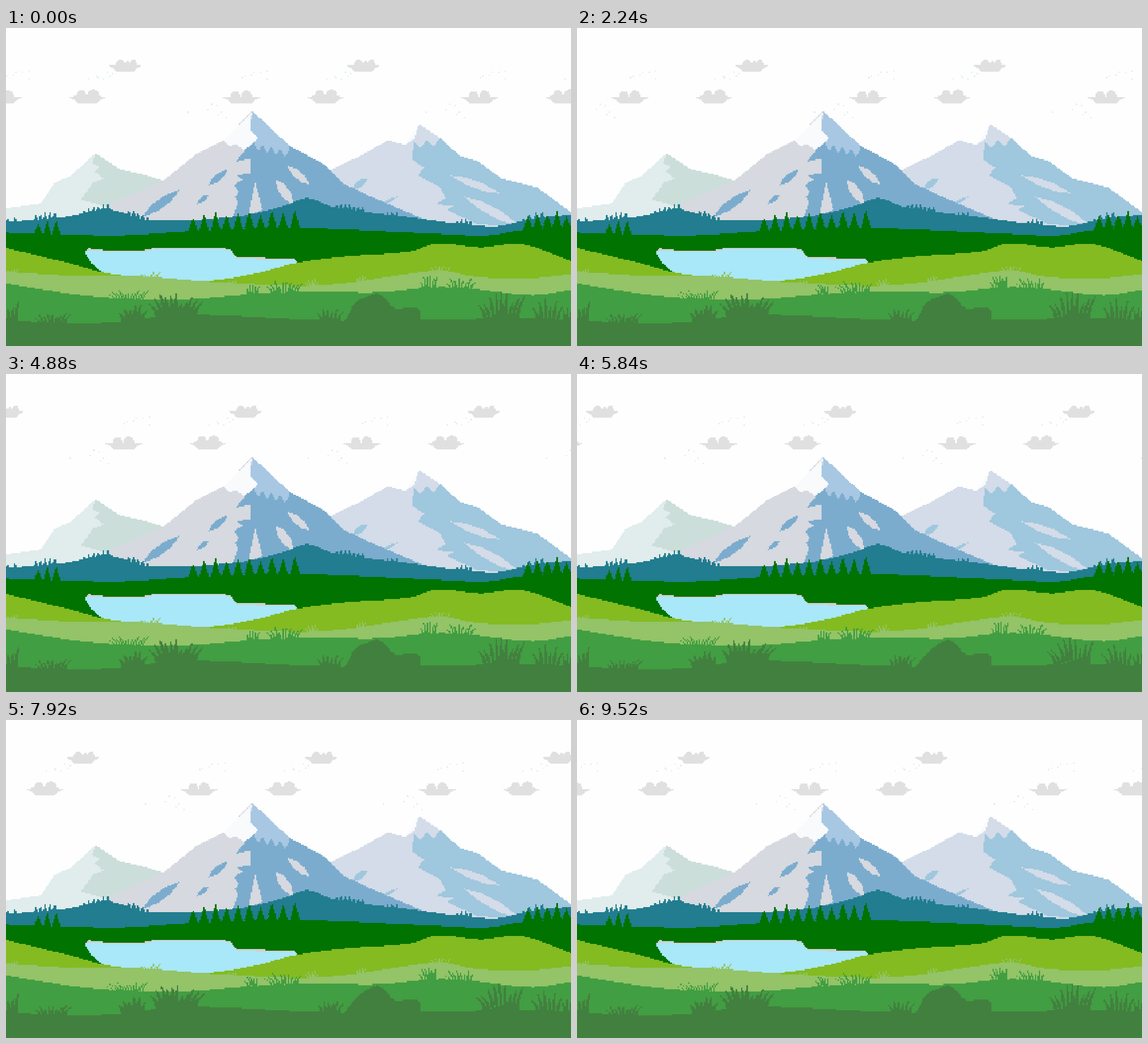
These frames come from a looping animation (998x561 px, 9.6 s). An HTML page with a canvas:

```html
<!DOCTYPE html>
<html lang="en">
<head>
<meta charset="utf-8">
<title>Mountain meadow</title>
<style>
html, body { margin: 0; width: 100%; height: 100%; overflow: hidden; background: #fefefe; }
canvas { display: block; width: 998px; height: 561px; image-rendering: pixelated; }
</style>
</head>
<body>
<canvas id="stage" width="427" height="240"></canvas>
<script>
const W = 427, H = 240, S = 998 / W;
const LOOP = 9600, STEP = 80, TILE = 180;
const TEAL = '#217d8f', PINE = '#007300', OLIVE = '#83bb21', PALE = '#94c368', MID = '#429e42', NEAR = '#42803f';
const stage = document.getElementById('stage').getContext('2d');
const backdrop = document.createElement('canvas');
backdrop.width = W;
backdrop.height = H;
let ctx = backdrop.getContext('2d');

const points = s => s.split(', ').map(p => p.split(' ').map(Number));
const random = seed => () => (seed = (seed * 16807 + 11) % 2147483647) / 2147483647;
const move = (pts, dx, dy = 0) => pts.map(([x, y]) => [x + dx, y + dy]);

// Scanline fill on the coarse grid, so every edge stays hard.
function fill(color, pts) {
  const ys = pts.map(p => p[1] / S);
  const top = Math.max(0, Math.floor(Math.min(...ys)));
  const end = Math.min(H, Math.ceil(Math.max(...ys)));
  ctx.fillStyle = color;
  for (let row = top; row < end; row++) {
    const y = (row + 0.5) * S, hits = [];
    pts.forEach(([x1, y1], i) => {
      const [x2, y2] = pts[(i + 1) % pts.length];
      if ((y1 <= y) !== (y2 <= y)) hits.push(x1 + (y - y1) / (y2 - y1) * (x2 - x1));
    });
    hits.sort((a, b) => a - b);
    for (let i = 0; i + 1 < hits.length; i += 2) {
      const a = Math.round(hits[i] / S), b = Math.round(hits[i + 1] / S);
      if (b > a) ctx.fillRect(a, row, b - a, 1);
    }
  }
}

// Curve through key points, closed along the bottom of the stage.
function land(s) {
  const p = points(s), out = [];
  for (let i = 0; i < p.length - 1; i++) {
    const a = p[Math.max(0, i - 1)], b = p[i], c = p[i + 1], d = p[Math.min(p.length - 1, i + 2)];
    const bend = (c[1] - a[1]) / (c[0] - a[0]) * (c[0] - b[0]);
    const next = (d[1] - b[1]) / (d[0] - b[0]) * (c[0] - b[0]);
    for (let t = 0; t < 1; t += 0.125) {
      const u = 1 - t, ease = t * t * (3 - 2 * t);
      out.push([b[0] + t * (c[0] - b[0]), b[1] + ease * (c[1] - b[1]) + t * u * u * bend - t * t * u * next]);
    }
  }
  return [...out, p[p.length - 1], [998, 561], [0, 561]];
}

// Row of hanging teeth between two points.
function teeth(x1, y1, x2, y2, n, depth) {
  return Array.from({ length: 2 * n + 1 }, (_, i) => {
    const t = i / (2 * n);
    return [x1 + t * (x2 - x1), y1 + t * (y2 - y1) + (i % 2 ? depth : 0)];
  });
}

function streak(color, x1, y1, x2, y2, w) {
  const len = Math.hypot(x2 - x1, y2 - y1), nx = (y1 - y2) / len * w / 2, ny = (x2 - x1) / len * w / 2;
  const at = (t, side) => [x1 + t * (x2 - x1) + side * nx, y1 + t * (y2 - y1) + side * ny];
  fill(color, [at(0, 0), at(0.35, 1), at(0.7, 1), at(1, 0), at(0.65, -1), at(0.3, -1)]);
}

function forest(color, x1, x2, count, y1, y2, tall, half) {
  const rnd = random(x1 + 77);
  for (let i = 0; i < count; i++) {
    const t = count > 1 ? i / (count - 1) : 0, x = x1 + t * (x2 - x1), base = y1 + t * (y2 - y1);
    const h = tall * (0.75 + 0.35 * rnd()), left = [], right = [];
    for (let k = 1; k <= 8; k++) {
      const w = half * (k / 8) * (k % 2 ? 1.1 : 0.85);
      left.unshift([x - w, base - h + h * k / 8]);
      right.push([x + w, base - h + h * k / 8]);
    }
    fill(color, [[x, base - h], ...right, [x + half, base + 8], [x - half, base + 8], ...left]);
  }
}

// Fan of blades; the tips lean by dx while the roots stay.
function tuft(color, cx, base, half, tall, count, width, dx = 0) {
  const rnd = random(Math.round(cx * 7 + half));
  for (let i = 0; i < count; i++) {
    const u = count > 1 ? 2 * i / (count - 1) - 1 : 0;
    const root = cx + u * half * 0.65, x = cx + u * half + dx;
    const y = base - tall * (0.45 + 0.55 * rnd());
    const mid = root + (x - root) * 0.35, my = (base + y) / 2;
    fill(color, [[root - width, base + 5], [mid - width * 0.7, my], [x - 1, y], [x + 1.3, y],
      [mid + width * 0.7, my], [root + width, base + 5]]);
  }
}

function paintMountains() {
  const mint = '#cbdeda', ice = '#e1ecec', mist = '#d3dce8', sky = '#9fc7dd';
  const grey = '#d6d9df', blue = '#7bacce', cap = '#a7c7e3', snow = '#f8fafc';

  fill(mint, points('132 303, 158 221, 200 249, 240 258, 285 271, 240 345, 130 345'));
  fill(ice, points('0 318, 62 309, 86 273, 113 262, 158 221, 152 238, 166 245, 157 253, 173 266, 154 272, 132 303, 190 318, 190 345, 0 345'));

  fill(mist, points('570 252, 625 226, 675 198, 705 206, 730 170, 767 194, 802 226, 920 350, 600 350'));
  fill(snow, points('705 206, 727 174, 722 195'));
  fill(sky, [...teeth(720, 200, 767, 194, 2, 13), ...points('802 226, 833 235, 876 266, 938 281, 998 325, 998 352, 880 350, 830 345, 778 320, 790 314, 760 311, 776 300, 766 280, 727 260, 738 247, 717 232')]);
  streak(sky, 638, 266, 612, 284, 11);
  streak(sky, 692, 297, 661, 313, 5);
  streak(mist, 784, 260, 874, 292, 12);
  streak(mist, 808, 297, 908, 349, 15);

  fill(grey, points('435 146, 470 250, 450 345, 200 345, 180 312, 280 268, 335 223, 385 198'));
  fill(blue, points('434 200, 500 208, 558 238, 597 275, 640 295, 740 338, 400 338, 410 306, 404 298, 411 290, 403 276, 418 268, 408 260, 433 256, 433 230, 406 236'));
  streak(blue, 392, 249, 358, 278, 11);
  streak(blue, 307, 285, 240, 334, 15);
  streak(blue, 358, 293, 337, 310, 8);
  streak(grey, 476, 267, 508, 311, 16);
  streak(grey, 496, 243, 537, 277, 13);
  fill(grey, points('440 271, 453 320, 428 332'));
  fill(cap, [[435, 146], [500, 207], ...teeth(500, 217, 438, 203, 4, 12), [432, 210], [445, 195], [432, 180]]);
  fill(snow, [[434, 148], [432, 180], [445, 195], ...teeth(430, 210, 384, 198, 2, 8)]);
}

function paintHills() {
  fill(TEAL, land('0 342, 100 334, 178 320, 255 339, 410 332, 490 314, 532 300, 580 316, 700 332, 860 350, 925 337, 998 329'));
  forest(TEAL, 3, 16, 2, 343, 342, 12, 3);
  forest(TEAL, 53, 86, 5, 340, 335, 14, 4);
  forest(TEAL, 138, 180, 6, 330, 321, 13, 4);
  forest(TEAL, 217, 250, 5, 328, 339, 8, 4);
  forest(TEAL, 584, 630, 7, 318, 323, 9, 4);
  forest(TEAL, 674, 690, 3, 331, 333, 9, 3);
  forest(TEAL, 797, 820, 4, 345, 347, 9, 4);
  forest(TEAL, 914, 947, 4, 344, 335, 15, 4);

  fill(PINE, land('0 361, 200 366, 330 358, 520 353, 740 362, 850 366, 915 356, 998 353'));
  forest(PINE, 57, 89, 3, 362, 362, 23, 7);
  forest(PINE, 330, 510, 10, 358, 354, 31, 9);
  forest(PINE, 922, 990, 5, 354, 354, 30, 9);

  const lake = points('139 393, 146 389, 165 390, 177 393, 240 393, 265 387, 380 387, 397 391, 407 405, 508 406, 514 411, 510 430, 350 458, 200 440, 168 427, 150 412');
  fill('#d0d0d0', lake);
  fill('#a8e8f8', move(lake, 0, 2.5));

  fill(OLIVE, land('0 388, 100 412, 188 434, 350 446, 440 433, 515 414, 600 403, 715 394, 760 380, 838 387, 910 381, 998 411'));
  fill(PALE, land('0 430, 120 437, 240 438, 350 447, 520 455, 600 450, 715 433, 770 428, 830 439, 920 442, 998 434'));
  tuft(PALE, 12, 432, 9, 9, 4, 1.5);
  tuft(PALE, 255, 439, 17, 9, 7, 1.5);
  tuft(PALE, 400, 449, 7, 5, 3, 2);
  tuft(PALE, 540, 454, 12, 12, 5, 1.5);
  tuft(PALE, 627, 446, 8, 10, 4, 1.5);
  tuft(PALE, 768, 430, 17, 14, 6, 1.5);
}

function lens(color, cx, cy, rx, up, down) {
  const pts = [];
  for (let a = 0; a < 2 * Math.PI; a += 0.3) {
    pts.push([cx + rx * Math.cos(a), cy + Math.sin(a) * (Math.sin(a) > 0 ? down : up)]);
  }
  fill(color, pts);
}

// Flat boat with two or three bumps on top.
function cloud(cx, cy, half, bumps) {
  const color = '#e0e0e0';
  fill(color, points('-1 0, -0.65 -2, 0.65 -2, 1 0, 0.65 5, 0.5 11, -0.5 11, -0.65 5')
    .map(([x, y]) => [cx + x * half, cy + y]));
  for (const [dx, w, h] of bumps) lens(color, cx + dx, cy, w, h, 4);
}

function specks(seed, x, y, w, h) {
  const rnd = random(seed);
  ctx.fillStyle = '#dceef0';
  for (let i = 0; i < 7; i++) {
    ctx.fillRect(Math.round((x + rnd() * w) / S), Math.round((y + rnd() * h) / S), 1, 1);
  }
}

function paintSky(frame) {
  for (let k = -2; k < 3; k++) {
    const dx = (Math.floor(frame * 1.5) + k * TILE) * S;
    specks(51, dx + 415, 72, 47, 20);
    specks(73, dx + 320, 130, 85, 28);
    specks(95, dx + 145, 75, 62, 30);
    cloud(dx + 211, 67, 30, [[-9, 8, 11], [4, 9, 8], [14, 6, 12]]);
    cloud(dx + 144, 122, 33.5, [[-11, 9, 13], [10, 11, 14]]);
    cloud(dx + 416, 123, 33.5, [[-11, 9, 12], [9, 10, 13]]);
  }
}

const midLand = land('0 451, 150 473, 300 479, 440 469, 540 465, 660 466, 760 457, 820 460, 930 471, 998 462');
const nearLand = land('0 515, 115 521, 200 518, 280 508, 360 506, 550 515, 732 515, 830 513, 900 511, 998 514');
const rock = points('655 468, 668 474, 680 489, 688 495, 727 493, 732 500, 732 520, 596 520');

function paintMeadow(frame) {
  const breeze = frame % 10 < 5 ? 0 : -4;
  const wind = (1 - Math.cos(frame / 30 * 2 * Math.PI)) / 2;
  fill(MID, midLand);
  tuft(MID, 217, 477, 36, 15, 13, 1.6, breeze);
  tuft(MID, 436, 468, 11, 15, 5, 2, breeze);
  tuft(MID, 492, 466, 32, 21, 10, 2.2, breeze);
  tuft(MID, 747, 459, 15, 22, 6, 2.2, breeze);
  tuft(MID, 803, 459, 26, 19, 8, 2.2, breeze);

  fill(NEAR, nearLand);
  tuft(NEAR, 8, 515, 14, 36, 4, 4, -wind);
  tuft(NEAR, 82, 519, 32, 16, 9, 3, 2 * wind);
  tuft(NEAR, 224, 514, 24, 26, 6, 5, -4 * wind);
  tuft(NEAR, 300, 507, 47, 44, 11, 5, 5 * wind);
  tuft(NEAR, 572, 514, 22, 23, 6, 3.5, 3 * wind);
  tuft(NEAR, 875, 512, 41, 51, 9, 4, -6 * wind);
  tuft(NEAR, 957, 513, 26, 39, 6, 3.5, -4 * wind);
  tuft(NEAR, 992, 513, 8, 30, 3, 3, -2 * wind);
  fill(NEAR, [...rock, [600, 514], [608 + wind, 500 + 3 * wind],
    [611 + 4 * wind, 490 + 8 * wind], [624, 479 + 8 * wind], [640, 473 + 2 * wind]]);
}

paintMountains();
paintHills();
ctx = stage;
let shown = -1;
function tick() {
  const frame = Math.floor(performance.now() % LOOP / STEP);
  if (frame !== shown) {
    shown = frame;
    ctx.fillStyle = '#fefefe';
    ctx.fillRect(0, 0, W, H);
    paintSky(frame);
    ctx.drawImage(backdrop, 0, 0);
    paintMeadow(frame);
  }
  requestAnimationFrame(tick);
}
tick();
</script>
</body>
</html>
```
